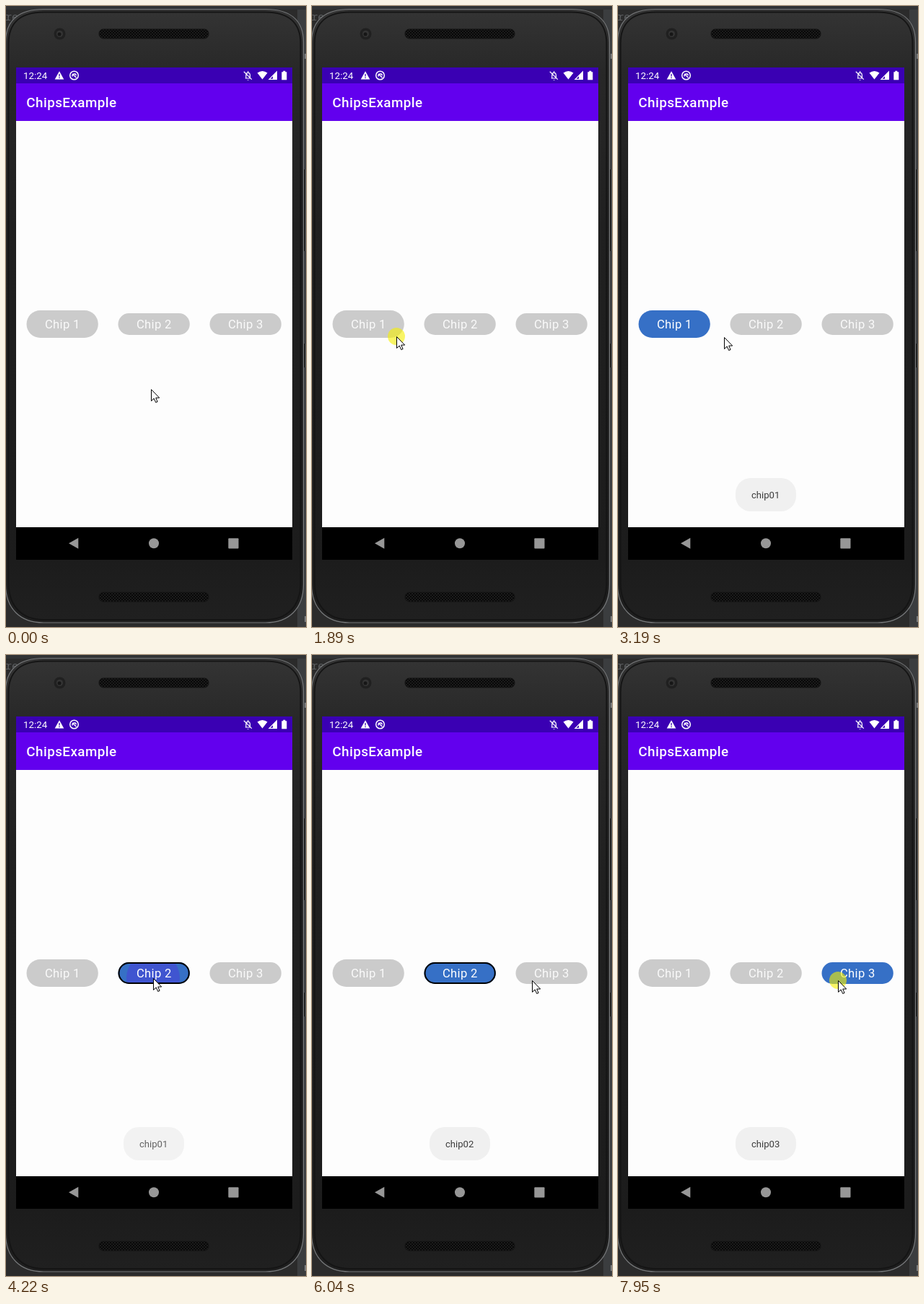
These frames come from a looping animation (416x859 px, 8000 ms). An HTML page:

```html
<!DOCTYPE html>
<html lang="en">
<head>
<meta charset="utf-8">
<title>Chips</title>
<style>
html, body { margin: 0; width: 100%; height: 100%; overflow: hidden; background: #2b2b2b; }
svg { display: block; width: 416px; height: 859px; }
text { font-family: Roboto, sans-serif; fill: #fff; white-space: pre; }
.chip text { font-size: 16.6px; letter-spacing: .36px; }
.toast text { font-size: 13.1px; fill: #3c3c3c; }
.code { font: 15px "Noto Sans Mono", monospace; fill: #5c5e60; }
</style>
</head>
<body>
<svg viewBox="0 0 416 859">
  <defs>
    <linearGradient id="body" x2="0" y2="1">
      <stop offset="0" stop-color="#343434"/>
      <stop offset=".1" stop-color="#282828"/>
      <stop offset=".35" stop-color="#202020"/>
      <stop offset=".9" stop-color="#1c1c1c"/>
      <stop offset="1" stop-color="#202020"/>
    </linearGradient>
    <pattern id="mesh" width="4" height="4" patternUnits="userSpaceOnUse">
      <rect width="4" height="4" fill="#1b1b1b"/>
      <path d="M0 0h2v2h-2zM2 2h2v2h-2z" fill="#080808"/>
    </pattern>
  </defs>

  <rect width="416" height="859" fill="#2b2b2b"/>
  <path d="M404 0h12v859h-12z" fill="#3b3d3f"/>
  <path d="M0 0h416v5h-416z" fill="#313335"/>
  <text class="code" x="-1" y="20">re</text>
  <path d="M412 226h3.5v113h-3.5zM412 467h3.5v33h-3.5z" fill="#1c1c1c"/>
  <path d="M415.5 226v113M415.5 467v33" stroke="#57595b"/>
  <path d="M415 66v7M415 844v8" stroke="#b8b8b8"/>

  <path id="shell" d="M52 4.500H360C392 4.500 412.500 18 412.500 50V800C412.500 834 392 853 360 853H52C20 853 -.5 834 -.5 800V50C-.5 18 20 4.500 52 4.500Z" fill="url(#body)" stroke="#77797b" stroke-width="1.200"/>
  <path d="M52 8.500H360C390 8.500 408.500 22 408.500 52V798C408.500 830 390 849 360 849H52C22 849 3.500 830 3.500 798V52C3.500 22 22 8.500 52 8.500Z" fill="none" stroke="#151515" stroke-width="2"/>
  <circle cx="74.500" cy="38.500" r="8" fill="#202020"/>
  <circle cx="74.500" cy="38.500" r="4.500" fill="#343434"/>
  <circle cx="74" cy="39" r="2.500" fill="#161616"/>
  <rect x="129" y="32" width="152" height="13" rx="6" fill="url(#mesh)" stroke="#141414"/>
  <rect x="129" y="811" width="152" height="13" rx="6" fill="url(#mesh)" stroke="#141414"/>

  <rect x="14" y="85" width="383" height="23" fill="#3a00b3"/>
  <rect x="14" y="107" width="383" height="52" fill="#6200ee"/>
  <rect x="14" y="159" width="383" height="562" fill="#fdfdfd"/>
  <rect x="14" y="721" width="383" height="45" fill="#000"/>

  <text x="24" y="101" font-size="13.300">12:24</text>
  <text x="28.300" y="140" font-size="18.800" font-weight="500" letter-spacing=".45">ChipsExample</text>

  <path d="M74 90.300L80.300 101.600H67.700Z" fill="#fff"/>
  <path d="M74 94v3.600M74 98.600v1.500" stroke="#3a00b3" stroke-width="1.300"/>
  <g fill="none" stroke="#fff" stroke-width="1.500">
    <circle cx="94.500" cy="96" r="5.800"/>
    <path d="M92 94l5.500 5M92 97.500q-.5-4 4-3.500l1.500 2"/>
    <path d="M331.800 100h7.600M332.800 100v-4q0-3.700 2.800-3.700t2.800 3.700v4M335.600 90v2M329.800 90.800l11 10.800" stroke-width="1.200"/>
    <path d="M365 101.300h10.300v-10.300z" stroke-width="1.200"/>
  </g>
  <path d="M348.500 92.500Q355.500 87.500 362.500 92.500L355.500 101.500ZM370 96.500l6-6v11h-6zM334.300 102h2.600q-1.300 1.600-2.600 0M382.300 91.300h2v-1.500h3v1.500h2v11h-7z" fill="#fff"/>
  <path d="M87 743.300L100.300 735.800V750.800Z" fill="#979797"/>
  <circle cx="205" cy="743.300" r="7" fill="#979797"/>
  <rect x="308.300" y="736.300" width="14.200" height="14.200" rx="1" fill="#979797"/>

  <g id="chips"></g>
  <g id="toasts"></g>
  <circle id="press" r="12" fill="#f6f000" fill-opacity=".6"/>
  <path id="arrow" d="M.5.5V16.300L4.200 12.900L6.700 18.400L9.100 17.400L6.700 12H11.700Z" fill="#fff" stroke="#000" stroke-linejoin="round"/>
</svg>
<script>
const LOOP = 8000;
const $ = id => document.getElementById(id);

// on / off: selected span; press: tap point
const chips = [
  { x: 28.5, y: 421, h: 38, on: 2020, off: 4220, press: [117, 457], toast: [2160, 2510, 6], gone: [4220, 4430, 5] },
  { x: 155.5, y: 425, h: 30, on: 4220, off: 6180, press: [204, 447], toast: [4430, 4700, 5], gone: [6320, 6460, 3], edge: true },
  { x: 282.5, y: 425, h: 30, on: 6180, off: LOOP, press: [305, 450], toast: [6460, 6670, 4] }
];

// start, end, steps, x, y
const moves = [
  [250, 590, 5, 156, 506],
  [790, 1140, 5, 142, 517],
  [1210, 1540, 5, 136, 510],
  [1610, 1890, 5, 117, 457],
  [2910, 3050, 3, 133, 461],
  [3120, 3190, 2, 147, 458],
  [3260, 3680, 7, 204, 447],
  [4290, 4700, 7, 304, 466],
  [4840, 4910, 1, 305, 467],
  [5500, 6040, 7, 305, 450]
];
const taps = [[1890, 2020], [4080, 4220], [6110, 6180], [7950, LOOP]];

// 0..1 in n equal jumps, the first at a and the last at b
function ramp(t, a, b, n) {
  if (t < a) return 0;
  return Math.min(1, (Math.floor((t - a) / (b - a) * (n - 1) + 1e-6) + 1) / n);
}

chips.forEach((c, i) => {
  const box = `x="${c.x}" y="${c.y}" width="99.3" height="${c.h}" rx="${c.h / 2}"`;
  const [px, py] = c.press;
  $("chips").insertAdjacentHTML("beforeend", `<g class="chip">
    <clipPath id="clip${i}"><rect ${box}/></clipPath>
    <rect ${box}/>
    <circle cx="${px}" cy="${py}" fill="#6200ee" clip-path="url(#clip${i})"/>
    <rect x="${c.x + 1}" y="${c.y + 1}" width="97.3" height="${c.h - 2}" rx="${c.h / 2 - 1}" fill="none" stroke="#000" stroke-width="2"/>
    <text x="${c.x + 25.4}" y="445.7">Chip ${i + 1}</text></g>`);
  $("toasts").insertAdjacentHTML("beforeend", `<g class="toast">
    <rect x="163" y="653" width="84" height="46" rx="21" fill="#f0f0f0"/>
    <text x="185" y="681">chip0${i + 1}</text></g>`);
  const g = $("chips").lastElementChild;
  [c.fill, c.ripple, c.outline] = [g.children[1], g.children[2], g.children[3]];
  c.label = g.children[4];
  c.bubble = $("toasts").lastElementChild;
});

function cursorAt(t) {
  let x = 201, y = 530;
  for (const [a, b, n, tx, ty] of moves) {
    const p = ramp(t, a, b, n);
    x += (tx - x) * p;
    y += (ty - y) * p;
  }
  return [Math.round(x), Math.round(y)];
}

function draw(t) {
  for (const c of chips) {
    const on = t >= c.on && t < c.off;
    const age = ramp(t, c.on, c.on + 490, 8);
    c.fill.setAttribute("fill", on ? "#3670c6" : "#cbcbcb");
    c.label.setAttribute("fill-opacity", on ? 1 : .9);
    c.outline.setAttribute("opacity", on && c.edge ? 1 : 0);
    c.ripple.setAttribute("r", 26 + 88 * age);
    c.ripple.setAttribute("opacity", on ? .24 * Math.min(1, 2 * (1 - age)) : 0);
    const gone = c.gone ? ramp(t, ...c.gone) : 0;
    c.bubble.setAttribute("opacity", ramp(t, ...c.toast) * (1 - gone));
  }
  const [x, y] = cursorAt(t);
  const at = `translate(${x} ${y})`;
  $("arrow").setAttribute("transform", at);
  $("press").setAttribute("transform", at);
  $("press").setAttribute("opacity", taps.some(([a, b]) => t >= a && t < b) ? 1 : 0);
}

const start = performance.now();
function tick() {
  draw((performance.now() - start) % LOOP);
  requestAnimationFrame(tick);
}
tick();
</script>
</body>
</html>
```
